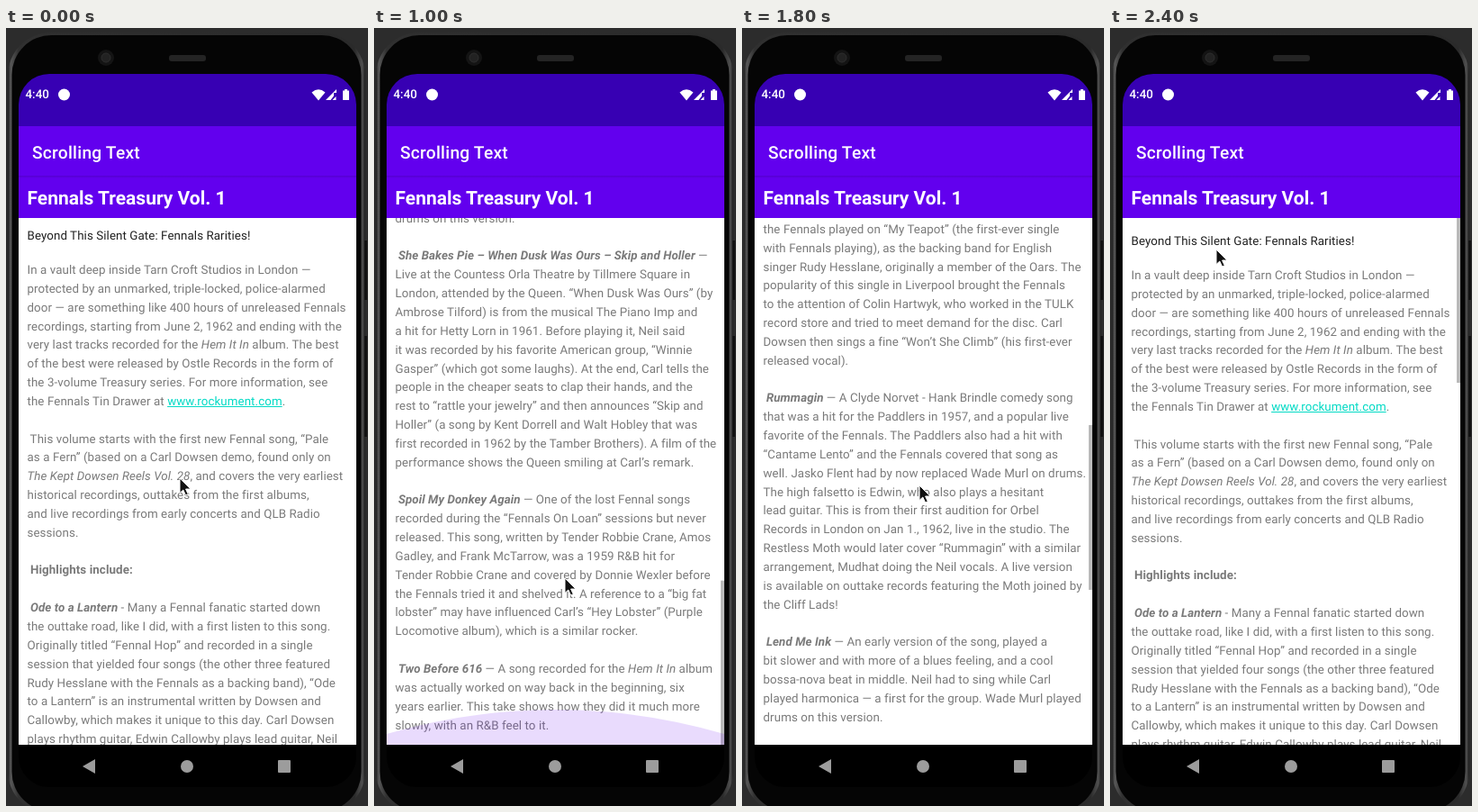
These frames come from a looping animation (402 px wide and 864 px high, 2500 ms). An HTML page:

```html
<!DOCTYPE html>
<html lang="en">
<head>
<meta charset="utf-8">
<title>Scrolling Text</title>
<style>
html, body { margin: 0; width: 100%; height: 100%; overflow: hidden; background: #2c2c2c; }
#stage {
  position: relative; width: 402px; height: 864px; overflow: hidden;
  font-family: Roboto, sans-serif; text-rendering: geometricPrecision; white-space: pre;
}
svg { position: absolute; left: 0; top: 0; }
#screen {
  position: absolute; left: 14px; top: 51px; width: 375px; height: 792px;
  border-radius: 34px; overflow: hidden; background: #000;
}
#screen > * { position: absolute; left: 0; width: 375px; }
#status { top: 0; height: 59px; background: #3700b3; }
#bar { top: 58px; height: 102px; background: #6200ee; }
#bar::after { content: ""; position: absolute; top: 55px; width: 100%; height: 3px; background: linear-gradient(#0002, #0000); }
#bar div, #status div { position: absolute; color: #fff; }
#clock { left: 7.5px; top: 14px; font: 500 13.4px/20px Roboto, sans-serif; }
#app { left: 15px; top: 15.5px; font: 500 19.2px/28px Roboto, sans-serif; letter-spacing: .0125em; }
#title { left: 9.5px; top: 66.5px; font: 700 21px/28px Roboto, sans-serif; }
#view { top: 160px; height: 585px; background: #fff; overflow: hidden; }
#doc {
  position: absolute; left: 9.5px; top: 1.4px; color: #7a7a7a;
  font-size: 13.37px; line-height: 20.85px; letter-spacing: .07px;
}
#doc div { height: 20.85px; }
#sub { position: absolute; top: 15.5px; color: #212121; }
#text { position: absolute; top: 53.6px; }
#doc u { color: #03dac5; }
#thumb { position: absolute; right: 0; top: 0; width: 4px; height: 183px; background: rgba(0, 0, 0, .27); }
</style>
</head>
<body>
<div id="stage">
  <svg width="402" height="864">
    <defs>
      <linearGradient id="rim" x2="1" y2="0">
        <stop offset="0" stop-color="#1c1c1c"/><stop offset=".008" stop-color="#585858"/>
        <stop offset=".03" stop-color="#303030"/><stop offset=".97" stop-color="#2a2a2a"/>
        <stop offset=".992" stop-color="#505050"/><stop offset="1" stop-color="#1c1c1c"/>
      </linearGradient>
    </defs>
    <rect x="2" y="5" width="397" height="868" rx="48" fill="url(#rim)"/>
    <rect x="6.500" y="8" width="388" height="862" rx="44" fill="#050505"/>
    <path d="M399.5 236v66M399.5 342v112" stroke="#111" stroke-width="3"/>
    <circle cx="111" cy="33" r="9" fill="#141414"/>
    <circle cx="111" cy="33" r="5" fill="#222" stroke="#2e2e2e"/>
    <rect x="181" y="30" width="41" height="7" rx="3" fill="#242424"/>
  </svg>

  <div id="screen">
    <div id="status"><div id="clock">4:40</div></div>
    <div id="bar"><div id="app">Scrolling Text</div><div id="title">Fennals Treasury Vol. 1</div></div>
    <div id="view">
      <div id="doc"><div id="sub">Beyond This Silent Gate: Fennals Rarities!</div><div id="text"></div></div>
      <div id="thumb"></div>
    </div>
  </div>

  <svg width="402" height="864">
    <g fill="#fff">
      <circle cx="64.5" cy="74" r="6.5"/>
      <path d="M339.5 71.500Q347 65 354.500 71.500L347 80.500Z"/>
      <path d="M367 68V72H364V75.500L360.500 80H355ZM362.500 80l4-4v4z"/>
      <path d="M374 69.500h2v-1.500h3v1.500h2v10.500h-7z"/>
    </g>
    <g fill="#9c9c9c">
      <path d="M85 820L99 812V828Z"/>
      <circle cx="201" cy="820" r="7"/>
      <rect x="302" y="813" width="14" height="14" rx="1"/>
    </g>
    <path id="glow" fill="#6200ee"/>
    <path id="cursor" d="M0 0V16.500L3.800 13L6.600 19L9.300 17.800L6.600 12H12Z"
      fill="#111" stroke="#fff" stroke-width="1" stroke-linejoin="round"/>
  </svg>
</div>

<script>
// *italic*  _bold italic_  #bold#  [link]
const article = `In a vault deep inside Tarn Croft Studios in London —
protected by an unmarked, triple-locked, police-alarmed
door — are something like 400 hours of unreleased Fennals
recordings, starting from June 2, 1962 and ending with the
very last tracks recorded for the *Hem It In* album. The best
of the best were released by Ostle Records in the form of
the 3-volume Treasury series. For more information, see
the Fennals Tin Drawer at [www.rockument.com].

 This volume starts with the first new Fennal song, “Pale
as a Fern” (based on a Carl Dowsen demo, found only on
*The Kept Dowsen Reels Vol. 28*, and covers the very earliest
historical recordings, outtakes from the first albums,
and live recordings from early concerts and QLB Radio
sessions.

 #Highlights include:#

 _Ode to a Lantern_ - Many a Fennal fanatic started down
the outtake road, like I did, with a first listen to this song.
Originally titled “Fennal Hop” and recorded in a single
session that yielded four songs (the other three featured
Rudy Hesslane with the Fennals as a backing band), “Ode
to a Lantern” is an instrumental written by Dowsen and
Callowby, which makes it unique to this day. Carl Dowsen
plays rhythm guitar, Edwin Callowby plays lead guitar, Neil
Strathvane plays bass, and Wade Murl plays drums. The
sessions were produced by Olaf Brennstett in Hamburg,
Germany, during the Fennals’ second visit from April
through July of 1961 to play in the Lodenstieg-section
clubs.

 _My Teapot_ and _Won’t She Climb_ — At the same session,
the Fennals played on “My Teapot” (the first-ever single
with Fennals playing), as the backing band for English
singer Rudy Hesslane, originally a member of the Oars. The
popularity of this single in Liverpool brought the Fennals
to the attention of Colin Hartwyk, who worked in the TULK
record store and tried to meet demand for the disc. Carl
Dowsen then sings a fine “Won’t She Climb” (his first-ever
released vocal).

 _Rummagin_ — A Clyde Norvet - Hank Brindle comedy song
that was a hit for the Paddlers in 1957, and a popular live
favorite of the Fennals. The Paddlers also had a hit with
“Cantame Lento” and the Fennals covered that song as
well. Jasko Flent had by now replaced Wade Murl on drums.
The high falsetto is Edwin, who also plays a hesitant
lead guitar. This is from their first audition for Orbel
Records in London on Jan 1., 1962, live in the studio. The
Restless Moth would later cover “Rummagin” with a similar
arrangement, Mudhat doing the Neil vocals. A live version
is available on outtake records featuring the Moth joined by
the Cliff Lads!

 _Lend Me Ink_ — An early version of the song, played a
bit slower and with more of a blues feeling, and a cool
bossa-nova beat in middle. Neil had to sing while Carl
played harmonica — a first for the group. Wade Murl played
drums on this version.

 _She Bakes Pie – When Dusk Was Ours – Skip and Holler_ —
Live at the Countess Orla Theatre by Tillmere Square in
London, attended by the Queen. “When Dusk Was Ours” (by
Ambrose Tilford) is from the musical The Piano Imp and
a hit for Hetty Lorn in 1961. Before playing it, Neil said
it was recorded by his favorite American group, “Winnie
Gasper” (which got some laughs). At the end, Carl tells the
people in the cheaper seats to clap their hands, and the
rest to “rattle your jewelry” and then announces “Skip and
Holler” (a song by Kent Dorrell and Walt Hobley that was
first recorded in 1962 by the Tamber Brothers). A film of the
performance shows the Queen smiling at Carl’s remark.

 _Spoil My Donkey Again_ — One of the lost Fennal songs
recorded during the “Fennals On Loan” sessions but never
released. This song, written by Tender Robbie Crane, Amos
Gadley, and Frank McTarrow, was a 1959 R&amp;B hit for
Tender Robbie Crane and covered by Donnie Wexler before
the Fennals tried it and shelved it. A reference to a “big fat
lobster” may have influenced Carl’s “Hey Lobster” (Purple
Locomotive album), which is a similar rocker.

 _Two Before 616_ — A song recorded for the *Hem It In* album
was actually worked on way back in the beginning, six
years earlier. This take shows how they did it much more
slowly, with an R&amp;B feel to it.`;

const $ = id => document.getElementById(id);

$("text").innerHTML = article.split("\n").map(line => "<div>" + line
  .replace(/\*(.+?)\*/g, "<i>$1</i>")
  .replace(/_(.+?)_/g, "<b><i>$1</i></b>")
  .replace(/#(.+?)#/g, "<b>$1</b>")
  .replace(/\[(.+?)\]/g, "<u>$1</u>") + "</div>").join("");

const LOOP = 2500, STEP = 100;

// time, scroll, cursor x, cursor y, thumb opacity, glow
const keys = [
  [0, 6, 193, 500, 0, 0],
  [100, 6, 193, 500, 0, 0],
  [500, 6, 195, 566, 0, 0],
  [600, 9, 196, 560, 1, 0],
  [700, 20, 198, 545, 1, 0],
  [800, 420, 204, 400, 1, 0],
  [900, 1000, 209, 500, 1, 0],
  [1000, 1293.4, 212, 611, 1, 1],
  [1200, 1293.4, 214, 490, 1, .3],
  [1300, 1250, 217, 533, 1, 0],
  [1400, 1150, 222, 633, 1, 0],
  [1500, 1011.75, 228, 706, 1, 0],
  [1800, 738.7, 197, 508, 1, 0],
  [1900, 725, 192, 500, 1, 0],
  [2200, 381.6, 176, 588, 1, 0],
  [2300, 150, 150, 400, 1, 0],
  [2400, 0, 118, 246, 1, 0]
];

function pose(t) {
  const i = keys.findIndex(k => k[0] >= t);
  if (i < 1) return keys[0];
  const a = keys[i - 1], b = keys[i];
  const p = (t - a[0]) / (b[0] - a[0]);
  return a.map((v, j) => v + (b[j] - v) * p);
}

function glowPath(amount) {
  const top = 796 - 39 * amount, side = 796 - 12 * amount;
  return `M14 796V${side}Q201.5 ${2 * top - side} 389 ${side}V796Z`;
}

function draw(t) {
  const [, scroll, x, y, bar, glow] = pose(t);
  $("doc").style.transform = `translateY(${-scroll}px)`;
  $("thumb").style.transform = `translateY(${scroll * .3113}px)`;
  $("thumb").style.opacity = bar;
  $("glow").setAttribute("d", glowPath(glow));
  $("glow").setAttribute("opacity", .14 * Math.min(1, glow * 1.5));
  $("cursor").setAttribute("transform", `translate(${Math.round(x)} ${Math.round(y)})`);
}

const start = performance.now();
function tick() {
  const t = (performance.now() - start) % LOOP;
  draw(Math.floor(t / STEP) * STEP);
  requestAnimationFrame(tick);
}
tick();
</script>
</body>
</html>
```
